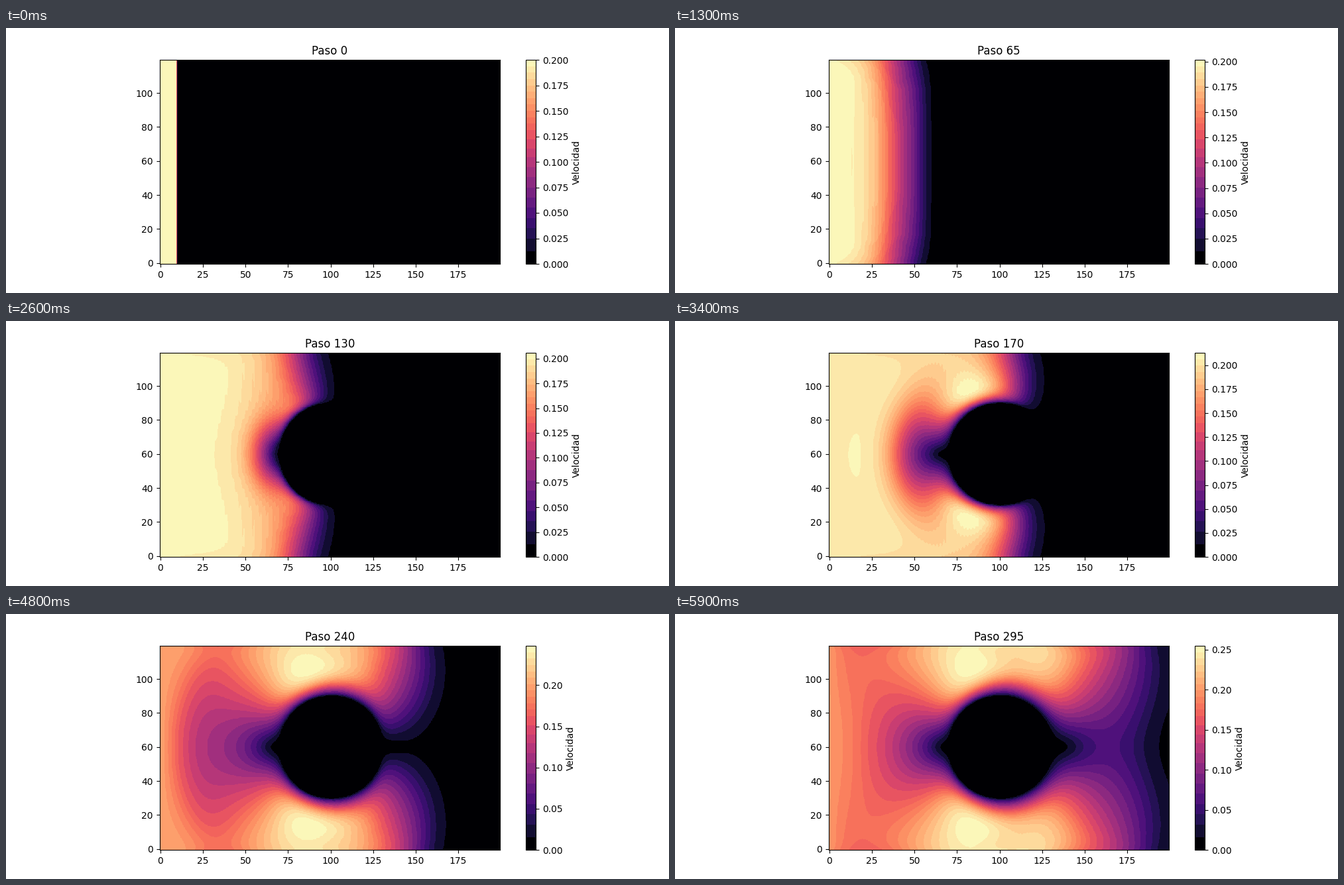
Recreate the animation shown at these times as a matplotlib script. Size 1000 px wide and 400 px high, loop 6 s.

```python
import matplotlib.pyplot as plt
import numpy as np
from matplotlib.animation import FuncAnimation
from matplotlib.colors import ListedColormap

NX, NY = 200, 120
U_IN = 0.2
TAU = 2.15
FRAMES, STEPS_PER_FRAME = 60, 5

# D2Q9 lattice: rest, four axis directions, four diagonals
CX = np.array([0, 1, 0, -1, 0, 1, -1, -1, 1])
CY = np.array([0, 0, 1, 0, -1, 1, 1, -1, -1])
W = np.array([4 / 9] + [1 / 9] * 4 + [1 / 36] * 4)
OPPOSITE = [0, 3, 4, 1, 2, 7, 8, 5, 6]

x, y = np.meshgrid(np.arange(NX), np.arange(NY), indexing="ij")
solid = (x - 100) ** 2 + (y - 60) ** 2 <= 30 ** 2


def equilibrium(rho, ux, uy):
    cu = 3 * (CX[:, None, None] * ux + CY[:, None, None] * uy)
    return W[:, None, None] * rho * (1 + cu + cu ** 2 / 2 - 1.5 * (ux ** 2 + uy ** 2))


def macroscopic(f):
    rho = f.sum(axis=0)
    ux = (f[1] + f[5] + f[8] - f[3] - f[6] - f[7]) / rho
    uy = (f[2] + f[5] + f[6] - f[4] - f[7] - f[8]) / rho
    return rho, ux, uy


def spans(shift, size):
    """Destination and source slices for a shift that stays inside the grid."""
    dst = slice(max(shift, 0), size + min(shift, 0))
    src = slice(max(-shift, 0), size - max(shift, 0))
    return dst, src


def stream(f):
    out = f.copy()
    for i in range(1, 9):
        dx, sx = spans(CX[i], NX)
        dy, sy = spans(CY[i], NY)
        out[i, dx, dy] = f[i, sx, sy]
    return out


def apply_inlet(f):
    """Velocity inlet on the left edge."""
    f0, f1, f2, f3, f4, f5, f6, f7, f8 = f[:, 0]
    rho = (f0 + f2 + f4 + 2 * (f3 + f6 + f7)) / (1 - U_IN)
    side = (f2 - f4) / 2
    f[1, 0] = f3 + 2 / 3 * rho * U_IN
    f[5, 0] = f7 - side + rho * U_IN / 6
    f[8, 0] = f6 + side + rho * U_IN / 6


def advance(f):
    relaxed = f - (f - equilibrium(*macroscopic(f))) / TAU
    relaxed[:, solid] = f[OPPOSITE][:, solid]
    f = stream(relaxed)
    apply_inlet(f)
    return f


def simulate():
    ux = np.where(x < 10, U_IN, 0.0)
    f = equilibrium(np.ones((NX, NY)), ux, np.zeros((NX, NY)))
    fields = []
    for step in range(FRAMES * STEPS_PER_FRAME):
        if step % STEPS_PER_FRAME == 0:
            _, ux, uy = macroscopic(f)
            fields.append(np.where(solid, 0, np.hypot(ux, uy)).T)
        f = advance(f)
    return fields


def banded_magma():
    """Magma in flat bands, wide in the dark part and narrow in the bright part."""
    widths = np.array([19] * 2 + [15.5] * 7 + [14] * 4 + [9.6] * 11)
    edges = np.concatenate([[0], np.cumsum(widths) / widths.sum()])
    middles = (edges[:-1] + edges[1:]) / 2
    middles[0] = 0
    band = np.searchsorted(edges[1:-1], np.linspace(0, 1, 512), side="right")
    return ListedColormap(plt.get_cmap("magma")(middles)[band])


fields = simulate()

fig, ax = plt.subplots(figsize=(10, 4), dpi=100)
image = ax.imshow(fields[0], origin="lower", cmap=banded_magma(), vmin=0, vmax=U_IN)
fig.colorbar(image, ax=ax, label="Velocidad")
title = ax.set_title("Paso 0")


def update(frame):
    speed = fields[frame]
    image.set_data(speed)
    image.set_clim(0, speed.max())
    title.set_text(f"Paso {frame * STEPS_PER_FRAME}")
    return image, title


anim = FuncAnimation(fig, update, frames=FRAMES, interval=100, repeat=True, repeat_delay=0)
plt.show()
```
